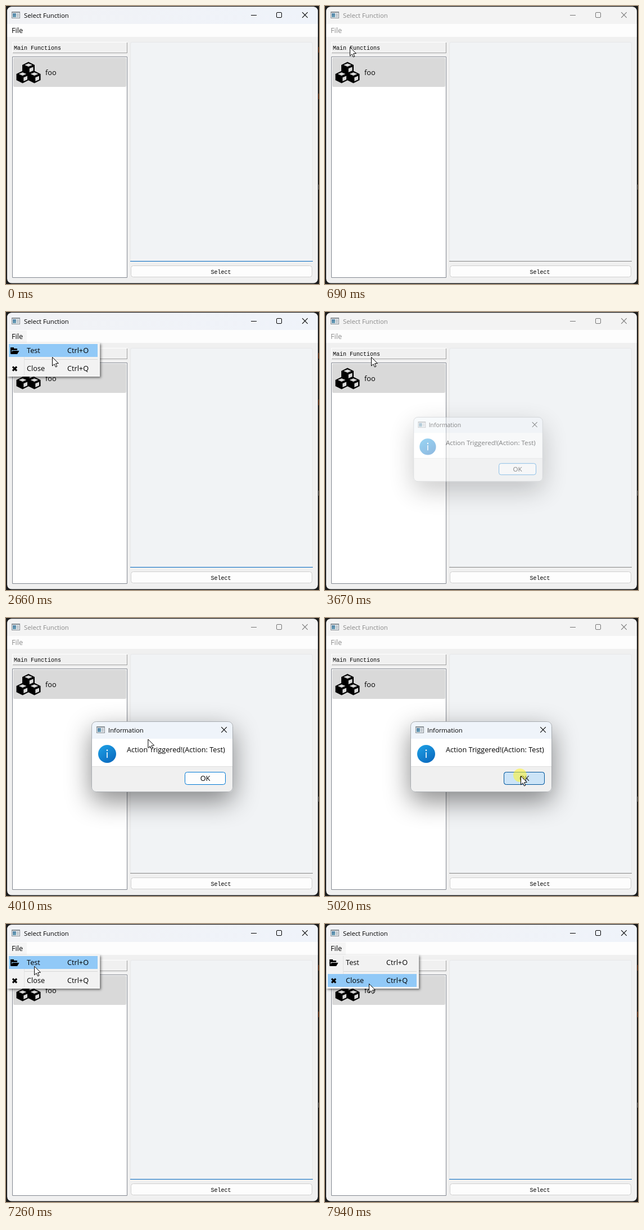
An HTML page with a canvas for the animation above (8000 ms loop, 557 px wide and 495 px high).

```html
<!DOCTYPE html>
<html lang="en">
<head>
<meta charset="utf-8">
<title>Select Function</title>
<style>
  html, body { margin: 0; width: 100%; height: 100%; overflow: hidden; background: #1c1c1c; }
  canvas { display: block; }
</style>
</head>
<body>
<canvas id="stage" width="557" height="495"></canvas>
<script>
const W = 557, H = 495, LOOP = 8000;
const stage = document.getElementById('stage').getContext('2d');
const layer = Object.assign(document.createElement('canvas'), { width: W, height: H }).getContext('2d');
let g = stage;

const UI = '12.7px "Open Sans", "Noto Sans", sans-serif';
const CAPTION = '11.3px "Open Sans", "Noto Sans", sans-serif';
const MONO = '10px "Liberation Mono", monospace';

// Places the pointer visits
const spot = {
  entry: { x: 150, y: -20 },
  header: { x: 44, y: 73 },
  file: { x: 27, y: 49 },
  test: { x: 82, y: 80 },
  dialog: { x: 346, y: 290 },
  ok: { x: 348, y: 281 },
  item: { x: 47, y: 120 },
  close: { x: 78, y: 106 },
  below: { x: 80, y: 113 }
};

const moves = [
  { at: 380, lasts: 310, to: spot.header },
  { at: 880, lasts: 520, to: spot.file },
  { at: 2250, lasts: 410, to: spot.test },
  { at: 3700, lasts: 520, to: spot.dialog },
  { at: 4610, lasts: 270, to: spot.ok },
  { at: 6030, lasts: 300, to: spot.item },
  { at: 6430, lasts: 370, to: spot.file },
  { at: 7050, lasts: 450, to: spot.close },
  { at: 7600, lasts: 70, to: spot.below },
  { at: 7930, lasts: 10, to: spot.close }
];

const ramp = (t, start, lasts) => Math.min(1, Math.max(0, (t - start) / lasts));
const pulse = (t, from, to, fade) => ramp(t, from, fade) - ramp(t, to, fade);
const during = (t, from, to) => t >= from && t < to;
const smooth = k => k * k * (3 - 2 * k);
const mix = (a, b, k) => a + (b - a) * k;
const gray = v => `rgb(${v},${v},${v})`;

function pointerAt(t) {
  return moves.reduce((p, { at, lasts, to }) => {
    const k = smooth(ramp(t, at, lasts));
    return { x: mix(p.x, to.x, k), y: mix(p.y, to.y, k) };
  }, spot.entry);
}

const inside = (p, x, y, w, h) => p.x >= x && p.x < x + w && p.y >= y && p.y < y + h;

function rect(x, y, w, h, fill) {
  g.fillStyle = fill;
  g.fillRect(x, y, w, h);
}

function stroke(color, width = 1) {
  g.strokeStyle = color;
  g.lineWidth = width;
  g.stroke();
}

function fill(color, rule = 'nonzero') {
  g.fillStyle = color;
  g.fill(rule);
}

function box(x, y, w, h, r, color, border) {
  const inset = border ? .5 : 0;
  g.beginPath();
  g.roundRect(x + inset, y + inset, w - 2 * inset, h - 2 * inset, r);
  if (color) fill(color);
  if (border) stroke(border);
}

function clipRound(x, y, w, h, r) {
  g.save();
  g.beginPath();
  g.roundRect(x, y, w, h, r);
  g.clip();
}

function disc(x, y, r, color) {
  g.beginPath();
  g.arc(x, y, r, 0, Math.PI * 2);
  fill(color);
}

function text(str, x, y, font, color = '#000', align = 'left') {
  g.font = font;
  g.fillStyle = color;
  g.textAlign = align;
  g.fillText(str, x, y);
}

function gradient(x1, y1, x2, y2, from, to) {
  const paint = g.createLinearGradient(x1, y1, x2, y2);
  paint.addColorStop(0, from);
  paint.addColorStop(1, to);
  return paint;
}

function cross(x, y, r, color, width) {
  g.beginPath();
  for (const side of [-1, 1]) {
    g.moveTo(x - r, y - r * side);
    g.lineTo(x + r, y + r * side);
  }
  stroke(color, width);
}

// Draws a group apart, then blends it in as one.
function blend(alpha, draw) {
  if (alpha <= 0) return;
  layer.clearRect(0, 0, W, H);
  g = layer;
  g.save();
  draw();
  g.restore();
  g = stage;
  g.globalAlpha = alpha;
  g.drawImage(layer.canvas, 0, 0);
  g.globalAlpha = 1;
}

function appIcon(x, y) {
  rect(x, y, 15, 12, '#868d93');
  rect(x + 1, y + 2, 13, 9, '#eef1f4');
  rect(x + 2, y + 3, 6, 7, gradient(x, y, x + 8, y + 10, '#3d6f9c', '#6fa3b8'));
  rect(x + 9, y + 3, 4, 7, '#c3cad0');
}

function face(x, y, ux, uy, vx, vy) {
  g.moveTo(x, y);
  g.lineTo(x + ux, y + uy);
  g.lineTo(x + ux + vx, y + uy + vy);
  g.lineTo(x + vx, y + vy);
  g.closePath();
}

// Hexagonal block with its top and right faces cut out
function cube(x, y) {
  g.beginPath();
  for (let i = 0; i < 6; i++) {
    const a = (i + .5) * Math.PI / 3;
    g.lineTo(x + 12.7 * Math.cos(a), y + 11 * Math.sin(a));
  }
  g.closePath();
  face(x, y - 8.2, 6.8, 2.8, -6.8, 2.8);
  face(x + 1.8, y + .8, 6.7, -2.8, 0, 6.6);
  fill('#000', 'evenodd');
}

function drawTitleBar(active) {
  rect(2, 1, 553, 31, '#f3f3f3');
  g.globalAlpha = active;
  rect(2, 1, 553, 31, gradient(2, 0, 555, 0, '#f1f2f5', '#eff3fa'));
  g.globalAlpha = 1;
  appIcon(10, 10);
  text('Select Function', 32, 21, CAPTION, gray(138 * (1 - active)));

  const ink = gray(118 * (1 - active));
  rect(436, 16, 10, 1, ink);
  box(481, 11, 10, 10, 1.5, null, ink);
  cross(532, 16, 4.8, ink, 1.1);
}

function drawWindow(active, fileHover, itemHover) {
  rect(0, 0, W, H, '#1c1c1c');
  if (active > .5) for (const y of [73, 156]) rect(556, y, 1, 10, '#8a3a14');
  rect(556, 318, 1, 9, '#6c6c6c');

  clipRound(2, 1.5, 553, 492, 8);
  rect(2, 1, 553, 493, '#f0f0f0');
  drawTitleBar(active);
  rect(2, 32, 553, 23, '#fdfdfd');
  if (fileHover) rect(2, 33, 35, 22, '#f5f5f5');
  text('File', 10, 48, UI, gray(140 * (1 - active)));
  g.restore();

  // Raised header above the list
  rect(11, 64, 205, 20, '#fff');
  rect(12, 65, 204, 19, '#a0a0a0');
  rect(12, 65, 203, 18, '#f0f0f0');
  text('Main Functions', 14, 78, MONO);

  box(11, 90, 205, 394, 0, '#fff', '#828790');
  if (itemHover) box(13, 92, 201, 52, 2, '#cce8ff', '#10202c');
  else box(13, 92, 201, 52, 2, '#d9d9d9');
  cube(40, 110.5);
  for (const x of [29.5, 50.5]) cube(x, 126.5);
  text('foo', 70, 123, UI);

  // Output pane, underlined in blue while focused
  box(221, 64, 325, 391, 3, '#f1f3f5', '#e6e7e9');
  rect(221, 454, 325, 1, active > 0 ? '#0067c0' : '#868686');

  box(222, 462, 323, 21, 4, '#fdfdfd', '#d0d0d0');
  text('Select', 382.5, 477, MONO, '#000', 'center');
}

function drawMenu(pointer) {
  g.shadowColor = 'rgba(0,0,0,.5)';
  g.shadowBlur = 4;
  g.shadowOffsetX = g.shadowOffsetY = 2;
  rect(2, 55, 165, 60, '#f8f8f8');
  g.shadowColor = 'transparent';
  rect(3, 56, 163, 58, '#f2f2f2');
  rect(32, 57, 1, 56, '#e2e2e2');
  rect(33, 84, 130, 1, '#d7d7d7');

  [['Test', 'Ctrl+O'], ['Close', 'Ctrl+Q']].forEach(([label, keys], i) => {
    const top = 57 + 32 * i;
    if (inside(pointer, 5, top, 158, 23.5)) rect(5, top, 158, 23, '#91c9f7');
    text(label, 37, top + 16, UI);
    text(keys, 109, top + 16, UI);
  });

  // Open folder and cross
  rect(8, 63, 6, 4, '#000');
  rect(8, 65, 12, 3, '#000');
  rect(8, 65, 2, 9, '#000');
  g.beginPath();
  face(11.5, 69, 12, 0, -3.5, 6);
  fill('#000');
  cross(15.5, 101, 3.6, '#000', 3.2);
}

function drawDialog(open, press, hover) {
  const scale = mix(.845, 1, open);
  g.translate(214, 218);
  g.scale(scale, scale);
  g.translate(-214, -218);

  g.shadowColor = 'rgba(0,0,0,.46)';
  g.shadowBlur = 46;
  g.shadowOffsetY = 16;
  box(152, 184, 252, 126, 8, '#f0f0f0');
  g.shadowColor = 'transparent';

  clipRound(152.5, 184.5, 251, 125, 8);
  rect(152, 184, 252, 31, '#eff4fa');
  rect(152, 215, 252, 49, '#fff');
  rect(152, 264, 252, 1, '#dfdfdf');
  g.restore();
  box(152, 184, 252, 126, 8, null, '#a9adb1');

  appIcon(161, 193);
  text('Information', 182, 204, CAPTION);
  cross(388, 199, 4.8, '#000', 1.1);

  disc(180, 242, 16, gradient(170, 227, 190, 258, '#1c9de3', '#0a68bd'));
  disc(180, 235.5, 1.3, '#fff');
  rect(179.2, 239, 1.6, 10, '#fff');

  text('Action Triggered!(Action: Test)', 215, 239, UI);
  box(318, 274, 73, 23, 4, hover ? '#e0eef9' : '#fdfdfd', '#0078d4');
  g.globalAlpha = press;
  box(318, 274, 73, 23, 4, '#cce4f7', '#005499');
  g.globalAlpha = 1;
  text('OK', 354.5, 290, UI, '#000', 'center');
}

function drawPointer({ x, y }, clicked) {
  if (clicked) disc(x - 1, y - 1, 12, 'rgba(255,244,40,.55)');
  g.save();
  g.translate(x + .5, y + .5);
  g.beginPath();
  g.moveTo(0, 0);
  g.lineTo(0, 15.5);
  g.lineTo(3.5, 12.2);
  g.lineTo(6, 17.5);
  g.lineTo(8.3, 16.5);
  g.lineTo(6, 11.3);
  g.lineTo(10.8, 10.9);
  g.closePath();
  fill('#fff');
  stroke('#000');
  g.restore();
}

function render(t) {
  const pointer = pointerAt(t);
  const active = 1 - pulse(t, 70, 1750, 110) - pulse(t, 3560, 6010, 110);
  const menu = t < 3540 ? ramp(t, 2110, 140) : ramp(t, 6900, 140);
  const dialog = pulse(t, 3590, 6010, 180);
  const press = pulse(t, 4860, 6010, 100);
  const clicked = during(t, 2110, 2240) || during(t, 3470, 3560) ||
                  during(t, 4900, 6010) || during(t, 6830, 6970);
  const fileHover = menu > 0 || active > 0 && inside(pointer, 2, 33, 35, 22);
  const itemHover = menu === 0 && active > .5 && inside(pointer, 13, 92, 201, 52);

  drawWindow(active, fileHover, itemHover);
  blend(menu, () => drawMenu(pointer));
  blend(dialog, () => drawDialog(dialog, press, inside(pointer, 318, 274, 73, 23)));
  if (t >= moves[0].at) drawPointer(pointer, clicked);
}

const start = performance.now();
function tick() {
  render((performance.now() - start) % LOOP);
  requestAnimationFrame(tick);
}
tick();
</script>
</body>
</html>
```
